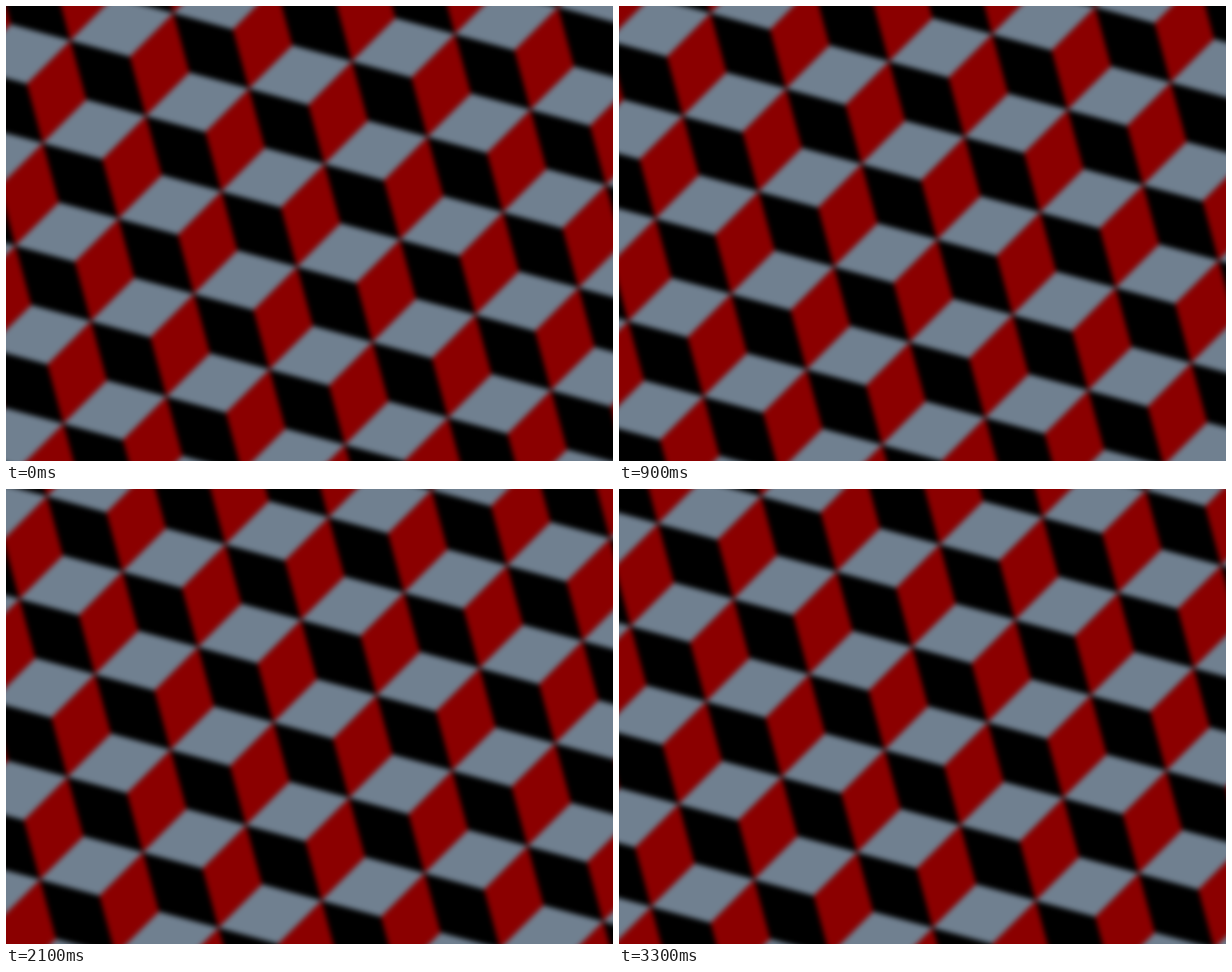
Write an HTML page that moves like this. It is 720 px wide and 540 px high and loops after 3.6 s.

```html
<!DOCTYPE html>
<html lang="en">
<head>
<meta charset="utf-8">
<title>Tumbling blocks</title>
<style>
  html, body { margin: 0; width: 100%; height: 100%; overflow: hidden; background: #000; }
  #stage { position: relative; width: 720px; height: 540px; overflow: hidden; }
  #blocks {
    position: absolute; left: -100px; top: -100px; width: 1100px; height: 740px;
    background: #000; filter: blur(3.4px);
    animation: sway 3600ms infinite;
  }
  /* six hard steps to the left, six back */
  @keyframes sway {
    0% { transform: translateX(0); animation-timing-function: steps(6, end); }
    50% { transform: translateX(-180px); animation-timing-function: steps(6, end); }
    100% { transform: translateX(0); }
  }
</style>
</head>
<body>
<div id="stage">
  <svg id="blocks" viewBox="-100 -100 1100 740">
    <path id="sides" fill="#8b0000"/>
    <path id="tops" fill="#708090"/>
  </svg>
</div>
<script>
  const origin = [377.7, 187.6];
  const across = [122.2, -32.3];
  const down = [89.6, 89.5];
  const add = (a, b, k = 1) => [a[0] + b[0] * k, a[1] + b[1] * k];
  const front = add([0, 0], add(across, down), 1 / 3);
  const back = add(across, front, -1);
  const polygon = points => 'M' + points.map(p => p.map(n => n.toFixed(2)).join()).join('L') + 'Z';

  let tops = '', sides = '';
  for (let i = -10; i <= 10; i++) {
    for (let j = -10; j <= 10; j++) {
      const left = add(add(origin, across, i), down, j);
      if (left[0] < -260 || left[0] > 1040 || left[1] < -260 || left[1] > 740) continue;
      const right = add(left, across);
      const near = add(left, front);
      const far = add(left, back);
      const foot = add(left, down);
      tops += polygon([left, far, right, near]);
      sides += polygon([right, near, foot, add(foot, back)]);
    }
  }
  document.getElementById('tops').setAttribute('d', tops);
  document.getElementById('sides').setAttribute('d', sides);
</script>
</body>
</html>
```
